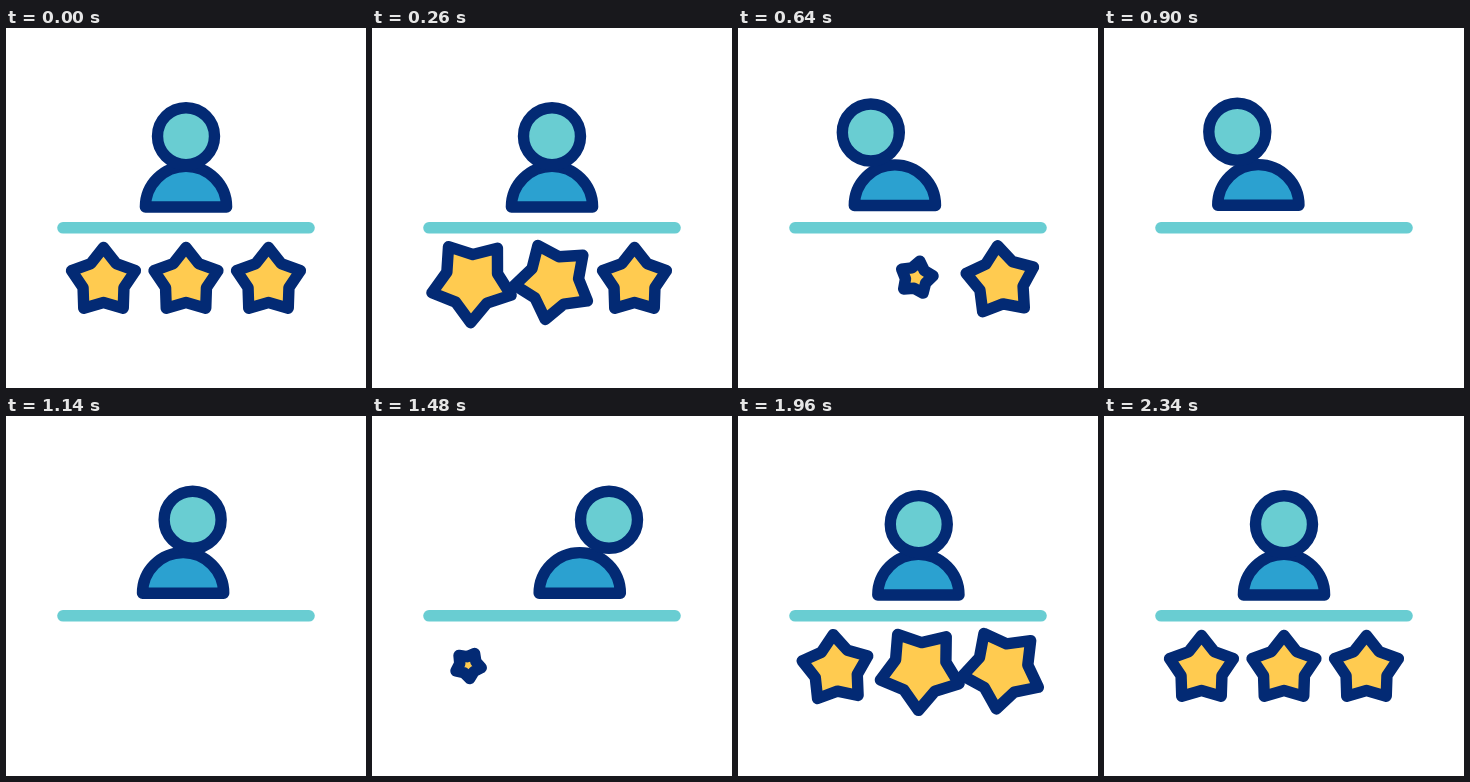
These frames come from a looping animation (360 by 360 pixels, 2.4 s). An HTML page:

```html
<!DOCTYPE html>
<html lang="en">
<head>
<meta charset="utf-8">
<title>Customer rating</title>
<style>
  html, body { margin: 0; width: 100%; height: 100%; overflow: hidden; background: #fff; }
  svg { display: block; width: 100%; height: 100%; }
  .ink { stroke: #032a74; stroke-width: 11.4; stroke-linejoin: round; }
</style>
</head>
<body>
<svg id="stage" viewBox="0 0 360 360">
  <path id="torso" class="ink" fill="#2ba1d0" d="M139.4 179a40.6 40.6 0 0 1 81.2 0z"/>
  <circle id="head" class="ink" fill="#69cdd2" cx="180" cy="108.2" r="28.5"/>
  <path d="M57 199.8H303" stroke="#69cdd2" stroke-width="11.6" stroke-linecap="round"/>
</svg>
<script>
const LOOP = 2400;
const STEP = 132;
const PIVOT_Y = 249.5;
const PEAK = { scale: 1.25, deg: -36 };
const stage = document.getElementById('stage');
const head = document.getElementById('head');
const torso = document.getElementById('torso');

const clamp = x => Math.max(0, Math.min(1, x));
const mix = (a, b, u) => a + (b - a) * u;
const span = (t, a, b) => clamp((t - a) / (b - a));
const ease = (t, a, b) => (1 - Math.cos(Math.PI * span(t, a, b))) / 2;
const rush = u => u ** 2.3;

const stars = [97.5, 180, 262.5].map(x => {
  const el = document.createElementNS('http://www.w3.org/2000/svg', 'polygon');
  el.setAttribute('class', 'ink');
  el.setAttribute('fill', '#ffcb50');
  stage.append(el);
  return { el, x };
});

// Ten corners of a star whose centre sits just below its pivot.
function starPoints(x, scale, deg) {
  const turn = deg * Math.PI / 180;
  const cx = x - 3.5 * scale * Math.sin(turn);
  const cy = PIVOT_Y + 3.5 * scale * Math.cos(turn);
  return Array.from({ length: 10 }, (_, i) => {
    const r = 33.6 * scale * (i % 2 ? 0.64 : 1);
    const a = turn + i * Math.PI / 5;
    return (cx + r * Math.sin(a)).toFixed(2) + ',' + (cy - r * Math.cos(a)).toFixed(2);
  }).join(' ');
}

// swell: 0 rest, 1 wound up; spin: 0 wound up, 1 vanished
function starPhase(t) {
  if (t < 1150) {
    return { swell: ease(t, 0, 214), spin: rush(span(t, 214, 583)) };
  }
  return { swell: 1 - ease(t, 1790, 2010), spin: rush(1 - span(t, 1425, 1790)) };
}

function drawStar({ el, x }, t) {
  const { swell, spin } = starPhase(t);
  const scale = mix(mix(1, PEAK.scale, swell), 0, spin);
  const deg = mix(PEAK.deg * swell, 165, spin);
  el.style.display = scale < 0.01 ? 'none' : '';
  el.setAttribute('points', starPoints(x, scale, deg));
}

// Sway to the left, across to the right, then home.
function sway(t, reach, outA, outB, crossA, crossB) {
  return reach * (2 * ease(t, crossA, crossB) - ease(t, outA, outB) - ease(t, 1540, 1995));
}

function place(el, x, y) {
  el.setAttribute('transform', `translate(${x.toFixed(2)} ${y.toFixed(2)})`);
}

function draw(t) {
  const lift = ease(t, 310, 765) - ease(t, 1540, 1995);
  place(head, sway(t, 57, 310, 765, 765, 1465), -4.5 * lift);
  place(torso, sway(t, 28.5, 320, 770, 795, 1535), -1.8 * lift);
  stars.forEach((star, i) => drawStar(star, t - i * STEP));
}

const start = performance.now();
function tick(now) {
  draw(Math.max(0, now - start) % LOOP);
  requestAnimationFrame(tick);
}
draw(0);
requestAnimationFrame(tick);
</script>
</body>
</html>
```
